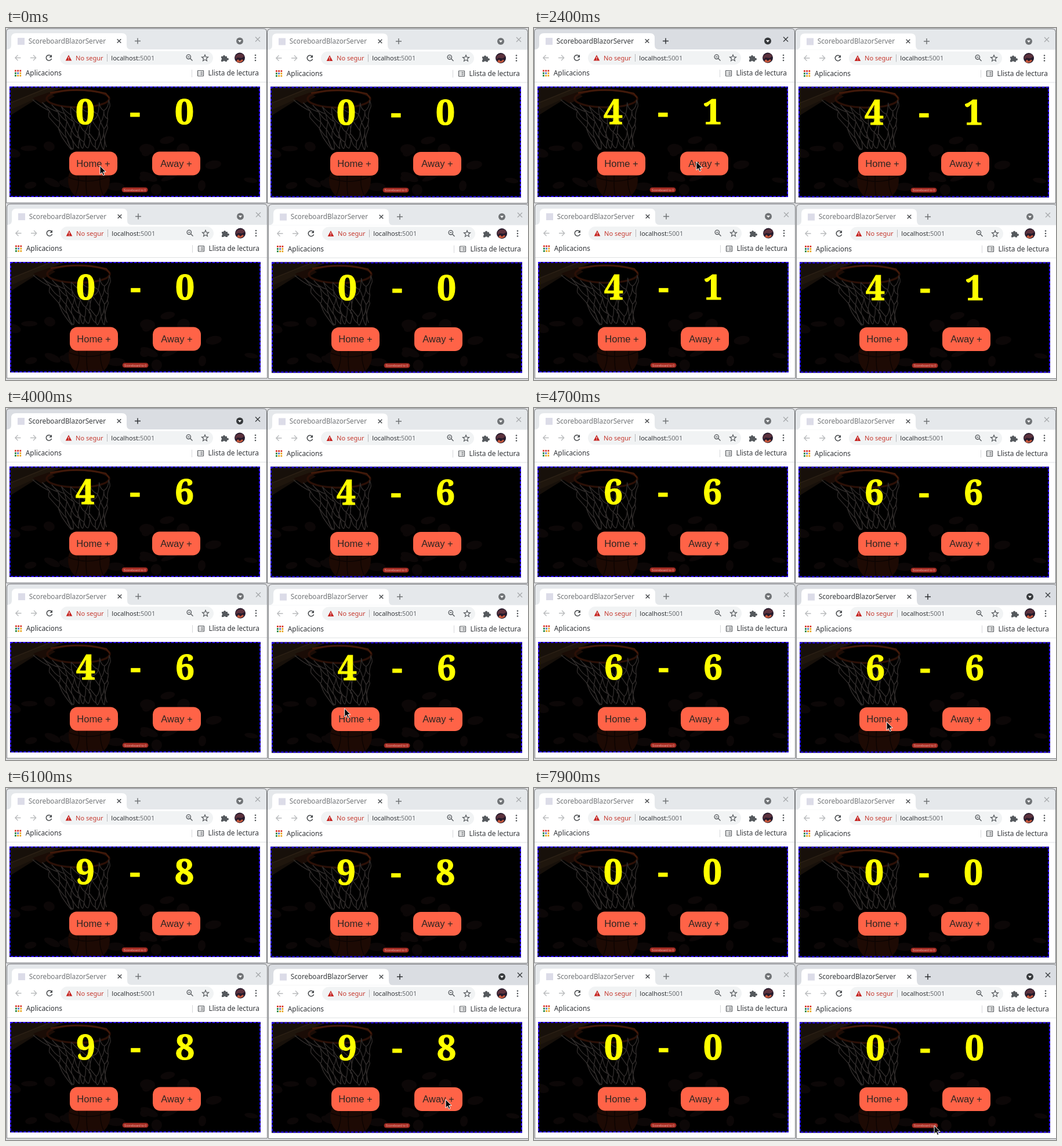
Write an HTML page that moves like this. It is 900 by 608 pixels and loops after 8000 ms.

```html
<!DOCTYPE html>
<html lang="ca">
<head>
<meta charset="utf-8">
<title>Scoreboard</title>
<style>
html, body { margin: 0; width: 100%; height: 100%; overflow: hidden; background: #dcdddf; }
svg { display: block; width: 900px; height: 608px; }
text { white-space: pre; }
.ui { font-family: "Noto Sans", "Open Sans", sans-serif; font-size: 11.85px; fill: #303337; }
.url { font-size: 11.05px; }
.score { font: bold 59px "Noto Serif", serif; fill: #ff0; stroke: #ff0; stroke-width: 1.1; text-anchor: middle; }
.btn { font: 16.6px "Liberation Sans", Arial, sans-serif; fill: #2b2522; text-anchor: middle; }
.mini { font: 5.4px "Liberation Sans", Arial, sans-serif; fill: #e5a79c; text-anchor: middle; }
.line { fill: none; stroke: #53575b; stroke-width: 1.5; }
.strip { fill: #e5e8eb; }
.title { font-size: 11.75px; }
.title, .menu { fill: #707376; }
.plus { stroke: #707376; }
.shut { stroke: #a5a8ab; stroke-width: 1.2; }
.active .strip { fill: #dadde2; }
.active .title, .active .menu { fill: #36393c; }
.active .plus, .active .shut { stroke: #303336; }
</style>
</head>
<body>
<svg id="stage" viewBox="0 0 900 608">
  <defs>
    <clipPath id="court"><rect x="6" y="101" width="432" height="191"/></clipPath>
    <g id="photo" clip-path="url(#court)"></g>
    <g id="chrome">
      <path d="M1 37C6 37 9 35 9 29V17Q9 9 17 9H200Q208 9 208 17V29Q208 37 215 37Z" fill="#fff"/>
      <rect x="1" y="37" width="448" height="265" fill="#fff"/>
      <rect x="93" y="40" width="264" height="23.5" rx="11.75" fill="#f1f3f4"/>
      <path d="M1 93.5H449" stroke="#dfe1e4"/>
      <rect x="20" y="17" width="12" height="12" fill="#dcdce8"/>
      <path class="line" d="M191.700 19.200l6.600 6.600m0-6.600l-6.600 6.600" style="stroke:#4a4d50"/>
      <path class="line" d="M25.500 51.500H16M20.500 46.800L15.800 51.500L20.500 56.200M42 51.500H51.500M47 46.800L51.700 51.500L47 56.200" style="stroke:#b9bbbd;stroke-width:1.300"/>
      <path class="line" d="M77.600 48.200A4.800 4.800 0 1 0 78.600 53" style="stroke:#45484b"/>
      <path d="M79 46V50.800H74.200Z" fill="#45484b"/>
      <path d="M108 46.500L113.300 56.500H102.700Z" fill="#c5221f"/>
      <path d="M108 49.800V53M108 54V55.200" stroke="#fff" stroke-width="1.100"/>
      <text class="ui url" x="120" y="55.700" style="fill:#c5392f">No segur</text>
      <path d="M174.500 45V58" stroke="#b6b9bc"/>
      <text class="ui url" x="181.300" y="55.700">localhost:<tspan fill="#6a6e72">5001</tspan></text>
      <circle class="line" cx="314.800" cy="49.800" r="3.700" style="stroke-width:1.300"/>
      <path class="line" d="M317.700 52.700L321.500 56.500M313 49.800H316.600" style="stroke-width:1.300"/>
      <path class="line" id="star" style="stroke-width:1.200"/>
      <path d="M371 49H374A2 2 0 1 1 378 49H381V52A2 2 0 1 1 381 55.500V58H377.800A1.900 1.900 0 0 0 374.200 58H371V55A1.900 1.900 0 0 0 371 51.600Z" fill="#55595d"/>
      <circle cx="403" cy="51.500" r="9" fill="#251a2c"/>
      <path d="M395 50Q399 43 408 45L411 49L406 52L399 51L396 54Z" fill="#5c323d"/>
      <path d="M397 57L400 54L403 57L407 54L409 56Q405 61 399 59Z" fill="#c8593c"/>
      <g fill="#55595d"><circle cx="430" cy="47" r="1.300"/><circle cx="430" cy="51.500" r="1.300"/><circle cx="430" cy="56" r="1.300"/></g>
      <g id="apps"></g>
      <text class="ui" x="33.800" y="82.200">Aplicacions</text>
      <path d="M320.500 72V85" stroke="#d5d7da"/>
      <rect class="line" x="330.500" y="73.500" width="10" height="9.500" rx=".8" style="stroke-width:1.200"/>
      <path class="line" d="M332.300 76H333.500M335 76H339M332.300 78.300H333.500M335 78.300H339M332.300 80.600H333.500M335 80.600H339" style="stroke-width:1"/>
      <text class="ui" x="348.500" y="82.200">Llista de lectura</text>
    </g>
    <g id="controls">
      <rect x="7" y="102" width="430" height="189" fill="none" stroke="#0b0430" stroke-width="2"/>
      <rect x="7" y="102" width="430" height="189" fill="none" stroke="#2808f8" stroke-width="2.100" stroke-dasharray="4.200 2.900"/>
      <text class="score" x="222.500" y="166">-</text>
      <rect x="109" y="213.500" width="83" height="41" rx="13" fill="#ff6347"/>
      <rect x="252" y="213.500" width="83" height="41" rx="13" fill="#ff6347"/>
      <text class="btn" x="150.500" y="239.700">Home +</text>
      <text class="btn" x="293.500" y="239.700">Away +</text>
      <rect x="199.800" y="275.600" width="44.500" height="8" rx="4" fill="#a92e25" stroke="#6b1d17" stroke-width=".8"/>
      <text class="mini" x="222" y="281.500">Scoreboard to 0</text>
    </g>
  </defs>
  <g id="windows"></g>
  <path id="cursor" d="M0 0V14.500L3.300 11.500L5.600 16.600L8 15.500L5.700 10.500H10.200Z" fill="#080808" stroke="#fff" stroke-width="1"/>
</svg>
<script>
const $ = id => document.getElementById(id);

function seeded(seed) {
  return () => (seed = (seed * 16807) % 2147483647) / 2147483647;
}

// Loose diamond mesh that narrows from the rim downwards.
function netPath(rnd) {
  const rows = 6, cols = 8;
  const grid = [];
  for (let r = 0; r < rows; r++) {
    const v = r / (rows - 1), left = 46 + 60 * v ** .7, right = 177 - 6 * v;
    grid.push(Array.from({ length: cols + 1 }, (_, c) => {
      const u = Math.min(1, (c + r % 2 / 2) / cols), loose = r ? 7 : 0;
      return [
        left + (right - left) * u + (rnd() - .5) * loose,
        124 + 84 * v + 12 * Math.sin(Math.PI * u) * (1 - v) + (rnd() - .5) * loose
      ];
    }));
  }
  let d = "";
  for (let r = 0; r < rows - 1; r++) {
    for (let c = 0; c <= cols; c++) {
      for (const next of [c, c + (r % 2 ? 1 : -1)]) {
        const to = grid[r + 1][next];
        if (!to) continue;
        const [x, y] = grid[r][c];
        d += `M${x} ${y}Q${(x + to[0]) / 2 + (rnd() - .5) * 9} ${(y + to[1]) / 2 + 4} ${to}`;
      }
    }
  }
  return d;
}

function drawPhoto() {
  const rnd = seeded(71);
  let s = '<rect x="6" y="101" width="432" height="191" fill="#000"/>';
  for (let i = 0; i < 22; i++) {
    const x = 12 + rnd() * 420, y = 182 + rnd() * 100;
    s += `<ellipse cx="${x}" cy="${y}" rx="${5 + rnd() * 12}" ry="${4 + rnd() * 6}" fill="#0c0707" transform="rotate(${rnd() * 50 - 25} ${x} ${y})"/>`;
  }
  s += `<path d="M6 101H105L62 117L6 152Z" fill="#17100a"/>
    <path d="M6 130L74 101H98L6 142Z" fill="#1f160d"/>
    <path d="M6 130L78 101" stroke="#2b2015" stroke-width="1.500"/>
    <path d="M46 121L74 111L84 118L62 131Z" fill="#1a0c06"/>
    <circle cx="143" cy="263" r="36" fill="#1d0a04"/>
    <path d="M108 258Q143 272 178 256M143 227Q134 260 141 299M117 238Q132 262 119 290M169 238Q155 262 168 290" fill="none" stroke="#0d0402" stroke-width="1.5"/>
    <ellipse cx="124" cy="122" rx="54" ry="15" fill="none" stroke="#2b1007" stroke-width="3.500"/>
    <path d="M76 112Q122 102 172 113L178 121" fill="none" stroke="#431a0a" stroke-width="2.500"/>
    <path d="${netPath(rnd)}" fill="none" stroke="#302c2b" stroke-width="1.400"/>`;
  $("photo").innerHTML = s;
}

function drawIcons() {
  const pts = [];
  for (let i = 0; i < 10; i++) {
    const r = i % 2 ? 2.6 : 5.8, a = i * Math.PI / 5;
    pts.push(`${343 + r * Math.sin(a)} ${52 - r * Math.cos(a)}`);
  }
  $("star").setAttribute("d", "M" + pts.join("L") + "Z");
  const hues = ["#d93025", "#d93025", "#d93025", "#188038", "#4d73c9", "#e8a317", "#188038", "#e8a317", "#e8a317"];
  $("apps").innerHTML = hues.map((c, i) =>
    `<rect x="${15 + i % 3 * 4.2}" y="${72.5 + Math.floor(i / 3) * 4.2}" width="2.800" height="2.800" fill="${c}"/>`).join("");
}

const places = [[0, 0], [450, .5], [1, 303], [452, 303.5]];

function drawWindows() {
  $("windows").innerHTML = places.map(([x, y]) => `<g class="win" transform="translate(${x} ${y})">
    <path class="strip" d="M1 38V7Q1 1.500 7 1.500H443Q449 1.500 449 7V38Z"/>
    <use href="#chrome"/>
    <text class="ui title" x="38.700" y="26.600">ScoreboardBlazorServer</text>
    <path class="line plus" d="M222 22.500H232M227 17.500V27.500"/>
    <circle class="menu" cx="403" cy="22.500" r="6"/>
    <path d="M400 21H406L403 24.800Z" fill="#fff"/>
    <path class="shut" d="M430 15.500L438 23.500M438 15.500L430 23.500"/>
    <use href="#photo"/><use href="#controls"/>
    <text class="score home" x="136.500" y="166">0</text>
    <text class="score away" x="307.500" y="166">0</text>
    <path d="M.5 302V7Q.5 1 7 1H443Q449.500 1 449.500 7V302Z" fill="none" stroke="#77797c"/>
  </g>`).join("");
}

drawPhoto();
drawIcons();
drawWindows();

const LOOP = 8000, RESET = 7700;
const homeClicks = [300, 1100, 1500, 1900, 4400, 4600, 4900, 5100, 5300];
const awayClicks = [2300, 2500, 2700, 2900, 3200, 3400, 5700, 5900, 6200, 6400, 6600, 6800];
// time, x, y of the pointer
const path = [
  [0, 162, 238], [1900, 162, 238], [2200, 280, 231], [3500, 280, 231],
  [4100, 608, 542], [5300, 608, 542], [5600, 758, 538], [6700, 758, 538],
  [7000, 713, 573], [7100, 706, 580], [7500, 690, 583], [8000, 690, 583]
];
const wins = [...document.querySelectorAll(".win")];
const homes = document.querySelectorAll(".home");
const aways = document.querySelectorAll(".away");

const count = (clicks, t) => t >= RESET ? 0 : clicks.filter(c => c <= t).length;

function pointer(t) {
  const i = path.findIndex(p => p[0] > t);
  const [t0, x0, y0] = path[i - 1], [t1, x1, y1] = path[i];
  const k = (t - t0) / (t1 - t0), e = k * k * (3 - 2 * k);
  return [x0 + (x1 - x0) * e, y0 + (y1 - y0) * e];
}

function setText(nodes, value) {
  nodes.forEach(n => { if (n.textContent !== String(value)) n.textContent = value; });
}

function render(now) {
  const t = Math.floor(now % LOOP / 100) * 100;
  const front = t >= 4400 ? 3 : t >= 100 ? 0 : -1;
  wins.forEach((w, i) => w.classList.toggle("active", i === front));
  setText(homes, count(homeClicks, t));
  setText(aways, count(awayClicks, t));
  $("cursor").setAttribute("transform", `translate(${pointer(t)})`);
}

const start = performance.now();
function tick() {
  render(performance.now() - start);
  requestAnimationFrame(tick);
}
tick();
</script>
</body>
</html>
```
